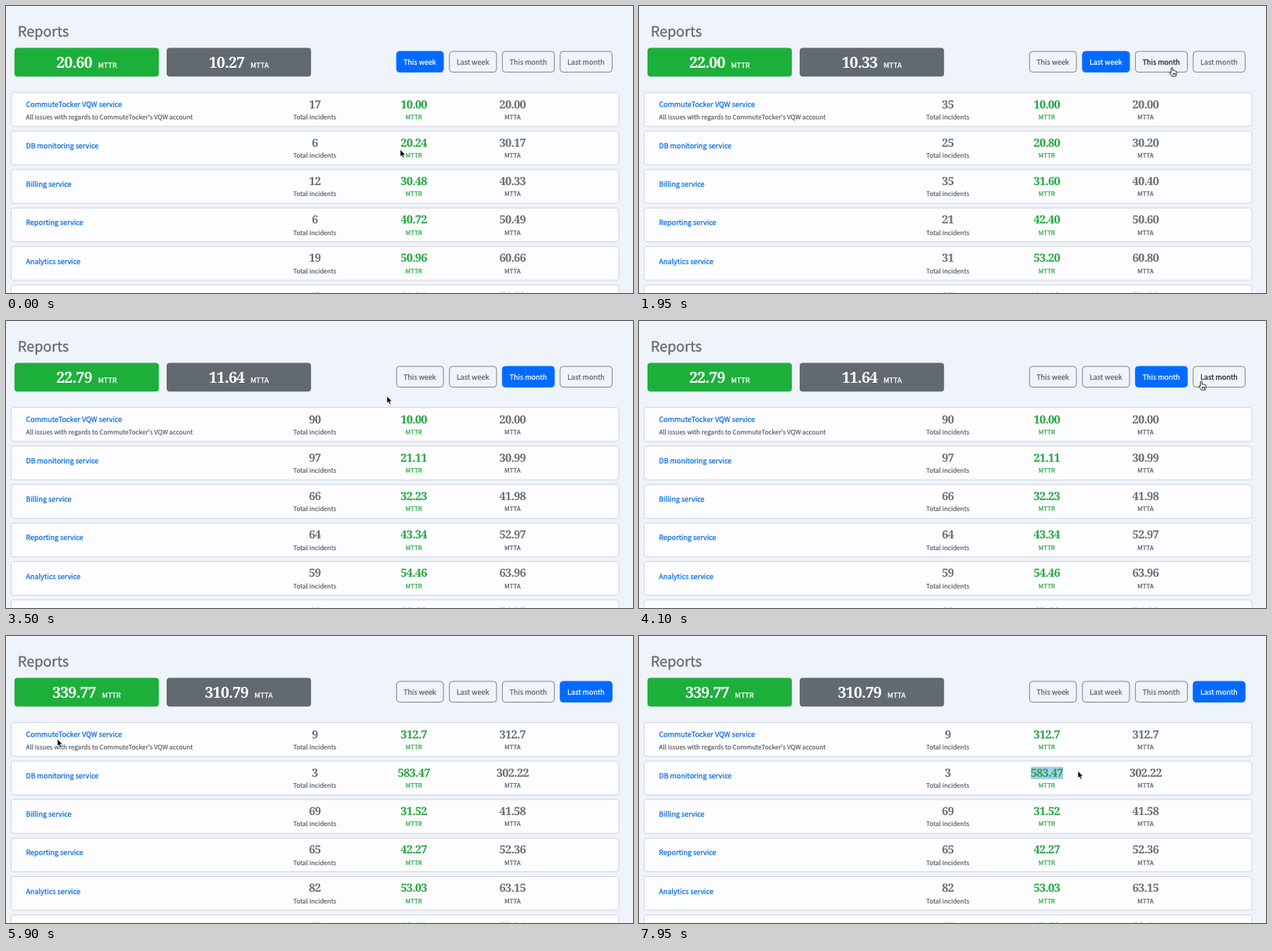
Write an HTML page that moves like this. It is 800 by 367 pixels and loops after 8000 ms.

```html
<!DOCTYPE html>
<html lang="en">
<head>
<meta charset="utf-8">
<title>Reports</title>
<style>
html, body { margin: 0; width: 100%; height: 100%; overflow: hidden; background: #eff4fb; }
svg { display: block; width: 100vw; height: 100vh; }
text { font-family: "Noto Sans CJK JP", "Noto Sans CJK SC", "Noto Sans CJK", sans-serif; text-rendering: geometricPrecision; color: #54595e; fill: currentColor; stroke: currentColor; stroke-width: .18px; }
.num { font-family: "Noto Serif", serif; font-weight: 600; font-size: 14.4px; letter-spacing: -.55px; color: #686d72; stroke: none; }
.title { font-size: 18px; color: #65696e; stroke-width: .3px; }
.small { font-size: 8.05px; }
.link { font-size: 9px; font-weight: 500; color: #0a6ddf; stroke-width: .25px; }
.green { color: #20a53c; }
.mid { text-anchor: middle; }
.big { color: #fff; }
.big .num { color: #fff; font-size: 19.4px; letter-spacing: -.75px; }
.big .unit { font-size: 9px; font-weight: 500; stroke-width: .3px; }
.button { font-size: 9px; font-weight: 500; stroke-width: .25px; }
</style>
</head>
<body>
<svg id="stage" viewBox="0 0 800 367"></svg>
<script>
const LOOP = 8000;
const stage = document.getElementById("stage");

function add(tag, attrs, content = "", parent = stage) {
  const node = document.createElementNS("http://www.w3.org/2000/svg", tag);
  for (const key in attrs) node.setAttribute(key, attrs[key]);
  node.textContent = content;
  parent.appendChild(node);
  return node;
}
const label = (x, y, cls, content, parent) => add("text", { x, y, class: cls }, content, parent);

const periods = [
  { from: 0, mttr: "20.60", mtta: "10.27", columns: [
    "17 6 12 6 19 15", "10.00 20.24 30.48 40.72 50.96 61.20", "20.00 30.17 40.33 50.49 60.66 70.82"] },
  { from: 1750, mttr: "22.00", mtta: "10.33", columns: [
    "35 25 35 21 31 37", "10.00 20.80 31.60 42.40 53.20 64.00", "20.00 30.20 40.40 50.60 60.80 71.00"] },
  { from: 2750, mttr: "22.79", mtta: "11.64", columns: [
    "90 97 66 64 59 60", "10.00 21.11 32.23 43.34 54.46 65.58", "20.00 30.99 41.98 52.97 63.96 74.95"] },
  { from: 5050, mttr: "339.77", mtta: "310.79", columns: [
    "9 3 69 65 82 67", "312.7 583.47 31.52 42.27 53.03 63.79", "312.7 302.22 41.58 52.36 63.15 73.94"] }
];
for (const p of periods) p.columns = p.columns.map(c => c.split(" "));

// Header
label(15, 38.5, "title", "Reports");

function summary(x, color, unit) {
  add("rect", { x, y: 53.5, width: 184.2, height: 36.8, rx: 4, fill: color });
  const group = label(x + 92, 78.6, "mid big", "");
  const value = add("tspan", { class: "num" }, "", group);
  add("tspan", { class: "unit", dx: 8 }, unit, group);
  return value;
}
const totalMttr = summary(10.8, "#1cb03b", "MTTR");
const totalMtta = summary(205, "#62696f", "MTTA");

const buttons = [
  ["This week", 498, 60], ["Last week", 565.5, 60.3], ["This month", 633, 66.6], ["Last month", 706.7, 66.6]
].map(([name, x, w]) => ({
  x, w,
  box: add("rect", { x: x + .3, y: 58, width: w - .2, height: 26.6, rx: 4, "stroke-width": .9 }),
  text: label(x + w / 2, 75.1, "mid button", name)
}));

// Service rows
const services = ["CommuteTocker VQW service", "DB monitoring service", "Billing service",
  "Reporting service", "Analytics service", "Search service"];
const columns = [[394, "Total incidents", ""], [520.3, "MTTR", " green"], [646.3, "MTTA", ""]];
let selection;
const cells = services.map((name, row) => {
  const y = 110.7 + row * 49.2;
  add("rect", { x: 6.5, y, width: 775.5, height: 43.2, rx: 3.5, fill: "#fdfdff", stroke: "#cdd2d9", "stroke-width": .9 });
  label(25.5, y + (row ? 22 : 17.9), "link", name);
  if (!row) label(25.5, y + 33.8, "small", "All issues with regards to CommuteTocker's VQW account");
  if (row === 1) selection = add("rect", { x: 500, y: 167.3, height: 15.8, fill: "#a6cbf3" });
  return columns.map(([x, unit, tone]) => {
    label(x, y + 34.2, "mid small" + tone, unit);
    return label(x, y + 19.9, "mid num" + tone, "");
  });
});

// Pointers, drawn with the hot spot at the origin
const pointers = {
  arrow: add("path", { d: "M0 0V9.2L2.1 7.4 3.6 10.7 5.2 10 3.8 6.8H6.6Z", fill: "#000", stroke: "#fff", "stroke-width": .7 }),
  hand: add("path", {
    d: "M-1 .7Q0-.6 1 .7V4Q2 3.2 2.8 4.3 3.8 3.6 4.5 4.8 5.8 4.3 6 5.8V8Q5.4 9.5 5 11.3H0Q-.8 9.4-2.8 7.2-3.3 5.8-2 5.8L-1 6.7ZM1.2 7V9.5M2.8 7V9.5M4.2 7V9.5",
    fill: "#fff", stroke: "#000", "stroke-width": .8, "stroke-linejoin": "round"
  }),
  beam: add("path", { d: "M-2-5Q0-5 0-4V4Q0 5-2 5M2-5Q0-5 0-4M0 4Q0 5 2 5", fill: "none", stroke: "#222", "stroke-width": .8 })
};

// time, x, y
const path = [
  [0, 503, 183.5], [150, 503, 183.5], [850, 600, 75], [1500, 607, 76], [1700, 624, 78], [1950, 680, 78.6],
  [2800, 680, 78.6], [3450, 486, 96], [3600, 486, 96], [4250, 753, 74], [4900, 743.5, 67.3], [5150, 743.5, 69],
  [5850, 65.5, 131.7], [6000, 65.5, 131.7], [6620, 505, 163], [6700, 505, 163], [6950, 499, 175],
  [7100, 499, 175], [7600, 553, 176], [7850, 560, 172.5], [8000, 560, 172.5]
];

function pointerAt(t) {
  const i = path.findIndex(p => p[0] > t);
  const [t0, x0, y0] = path[i - 1], [t1, x1, y1] = path[i];
  const u = (t - t0) / (t1 - t0), k = u * u * (3 - 2 * u);
  return [x0 + (x1 - x0) * k, y0 + (y1 - y0) * k];
}

let shown = -1;
function showPeriod(index) {
  if (index === shown) return;
  shown = index;
  const p = periods[index];
  totalMttr.textContent = p.mttr;
  totalMtta.textContent = p.mtta;
  cells.forEach((row, r) => row.forEach((cell, c) => cell.textContent = p.columns[c][r]));
}

function render(t) {
  const active = periods.filter(p => p.from <= t).length - 1;
  showPeriod(active);

  const [x, y] = pointerAt(t);
  let kind = x > 499 && x < 542 && y > 167 && y < 181 ? "beam" : "arrow";
  buttons.forEach((b, i) => {
    const hover = x > b.x && x < b.x + b.w && y > 58 && y < 85;
    const on = i === active;
    if (hover) kind = "hand";
    b.box.setAttribute("fill", on ? "#006aff" : "#eff4fb");
    b.box.setAttribute("stroke", on ? "#006aff" : "#747a81");
    b.text.style.color = on ? "#fff" : hover ? "#212529" : "#62686e";
  });

  const dragged = t > 7100 ? Math.min(41, Math.round((x - 500) / 6.84) * 6.84) : 0;
  selection.setAttribute("width", Math.max(0, dragged));

  for (const name in pointers) {
    pointers[name].setAttribute("visibility", name === kind ? "visible" : "hidden");
    pointers[name].setAttribute("transform", `translate(${x} ${y})`);
  }
}

function tick() {
  render(performance.now() % LOOP);
  requestAnimationFrame(tick);
}
tick();
</script>
</body>
</html>
```
